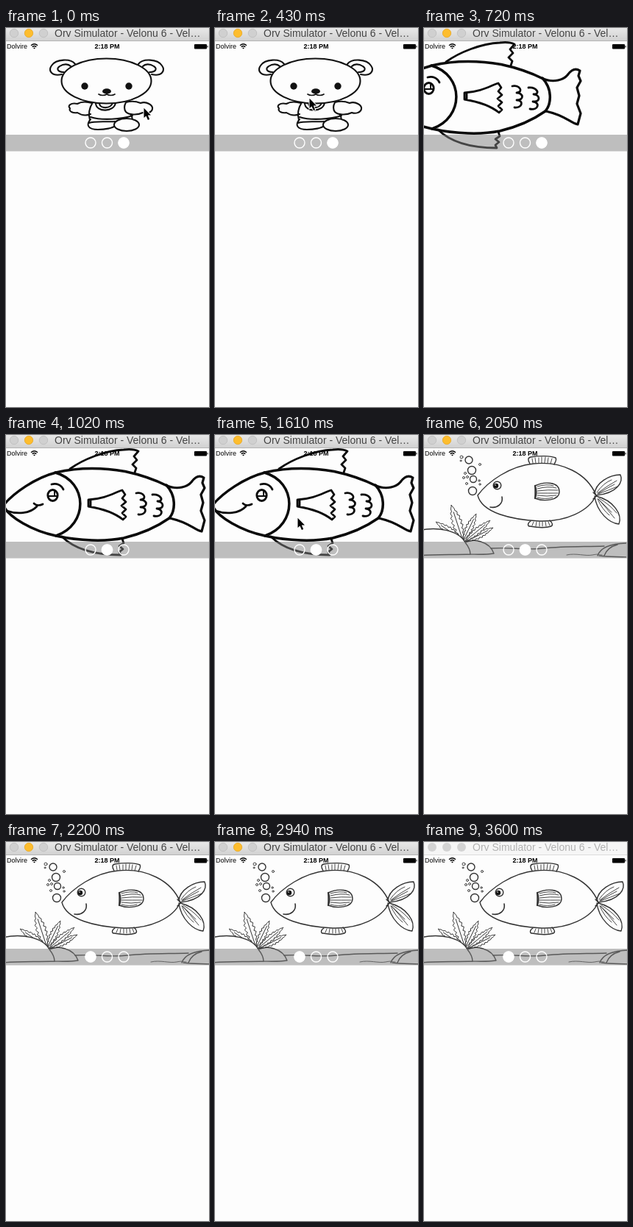
Write an HTML page that moves like this. It is 276 px wide and 515 px high and loops after 3700 ms.

```html
<!DOCTYPE html>
<html lang="en">
<head>
<meta charset="utf-8">
<title>Image pager</title>
<style>
html, body { margin: 0; width: 100%; height: 100%; overflow: hidden; background: #fdfdfd; }
svg { display: block; width: 100vw; height: 100vh; }
text { font-family: "Liberation Sans", Arial, sans-serif; }
.art { fill: none; stroke-linecap: round; stroke-linejoin: round; }
.bear { stroke: #111; stroke-width: 2.1; }
.carp { stroke: #0a0a0a; stroke-width: 3.5; }
.detail { stroke-width: 2.8; }
.reef { stroke: #333; stroke-width: 1.4; }
.thin { stroke-width: .9; }
.ink { fill: #111; stroke: none; }

.strip, .cursor, .dot, .active { animation: 3700ms step-end infinite; }
.strip { animation-name: strip; }
.cursor { animation-name: cursor; }
.dot { animation-name: dot; }
.active { animation-name: active; }

/* one loop = 3700 ms; every pose is held until the next */
@keyframes strip {
  0% { transform: translateX(-282px); }
  15.67% { transform: translateX(-140px); }
  19.45% { transform: translateX(-57px); }
  23.51% { transform: translateX(-3px); }
  27.56% { transform: translateX(0); }
  47.56% { transform: translateX(2px); }
  51.35% { transform: translateX(134px); }
  55.4% { transform: translateX(279px); }
  59.45%, 100% { transform: translateX(282px); }
}
@keyframes cursor {
  0% { transform: translate(186px, 108px); opacity: 1; }
  3.78% { transform: translate(109px, 97px); opacity: 1; }
  7.83% { transform: translate(100px, 94px); opacity: 1; }
  11.62% { transform: translate(127px, 95px); opacity: 1; }
  15.67% { transform: translate(127px, 95px); opacity: 0; }
  31.62% { transform: translate(192px, 109px); opacity: 1; }
  35.4% { transform: translate(148px, 104px); opacity: 1; }
  39.45% { transform: translate(123px, 110px); opacity: 1; }
  43.51% { transform: translate(111px, 112px); opacity: 1; }
  47.56%, 100% { transform: translate(111px, 112px); opacity: 0; }
}
@keyframes dot {
  0% { transform: translateX(160px); }
  27.56% { transform: translateX(137.5px); }
  59.45%, 100% { transform: translateX(115px); }
}
@keyframes active {
  0% { opacity: 1; }
  97.29%, 100% { opacity: 0; }
}
</style>
</head>
<body>
<svg viewBox="0 0 276 515" preserveAspectRatio="none">
  <defs>
    <linearGradient id="bar" x2="0" y2="1">
      <stop stop-color="#e8e8e8"/><stop offset="1" stop-color="#d0d0d0"/>
    </linearGradient>
    <clipPath id="page"><rect x="-3" y="18" width="281" height="150"/></clipPath>
    <g id="ear">
      <path d="M76 63C62 66 57 58 62 51C68 42 88 41 94 49"/>
      <path d="M79 60C70 60 68 55 73 52C79 48 85 49 88 52"/>
    </g>
  </defs>

  <g class="strip">
    <!-- reef fish -->
    <g transform="translate(-282)"><g class="art reef" clip-path="url(#page)">
      <path d="M76 82C90 63 120 42 152 39C190 35 225 52 237 82C227 104 195 118 160 117C122 115 82 106 76 82Z"/>
      <path d="M147 39C144 34 144 31 148 30C160 28 175 28 182 31C184 34 181 37 180 40M148 117C143 120 144 124 147 124C158 126 170 126 176 124C179 122 177 119 174 116"/>
      <path class="thin" d="M151 38l-1-6M155 38l-1-7M159 38v-7M163 38v-8M167 38l1-8M171 38l1-7M175 39l2-7M152 118l-2 5M156 118l-1 6M160 118v6M164 118v6M168 118l1 6M172 118l2 5"/>
      <path d="M154 69V86C166 91 187 89 187 77C187 63 166 63 154 69Z"/>
      <path d="M154 69C156 75 156 80 154 86" stroke-width="2.2"/>
      <path class="thin" d="M157 70Q170 66 179 69M157 73Q172 69 183 72M157 76Q172 74 185 75M157 79Q172 79 185 79M157 82Q170 84 183 82M157 85Q168 88 178 85"/>
      <path d="M235 80C236 65 255 54 270 54C274 63 267 79 237 82M235 83C238 105 255 120 268 121C273 108 261 89 237 83M237 82l-4-4M237 83l-4 4"/>
      <path class="thin" d="M238 78Q247 65 258 61M239 79Q252 69 265 62M240 80Q254 75 266 70M239 80Q250 73 262 67M239 87Q245 101 255 109M240 87Q250 98 262 113M241 86Q255 94 265 106M240 87Q249 96 258 105"/>
      <circle cx="102.500" cy="68.500" r="5.300"/><circle class="ink" cx="101" cy="69" r="3.200"/><circle cx="100" cy="68" r=".8" fill="#fff" stroke="none"/>
      <path d="M109 84C111 93 103 100 93 98" stroke-width="1.6"/>
      <circle cx="64" cy="34" r="5"/><circle cx="68" cy="48" r="5.500"/><circle cx="70" cy="60" r="4.500"/><circle cx="69" cy="76" r="5.500"/>
      <g class="thin">
        <circle cx="54" cy="30" r="2"/><circle cx="53" cy="35" r="1"/><circle cx="79" cy="40" r="1.500"/><circle cx="59" cy="52" r="1.500"/>
        <circle cx="57" cy="58" r="1.500"/><circle cx="62" cy="57" r="1.500"/><circle cx="61" cy="66" r="1.500"/><circle cx="78" cy="62" r="1.200"/><circle cx="79" cy="67" r="1.200"/>
      </g>
      <g id="plant" fill="#fdfdfd" stroke-width="1"></g>
      <path fill="#fdfdfd" d="M58 147C70 140 92 144 98 161C85 163 75 162 60 162Z"/>
      <path fill="#fdfdfd" d="M-5 130C20 124 50 129 59 146C63 151 66 157 66 162C40 163 20 162 -5 164Z"/>
      <path d="M94 154C125 152 135 157 165 154S220 152 248 151"/>
      <path class="thin" d="M197 163C210 160 222 165 232 163S240 163 245 163"/>
      <path d="M239 164C243 153 255 148 279 147M241 164C255 166 268 165 279 166M248 164C251 156 258 151 266 149"/>
    </g></g>

    <!-- winking fish -->
    <g class="art carp" clip-path="url(#page)">
      <path d="M-3 95C10 79 40 58 68 51C98 44 130 44 162 49.500C183 54 203 61 219 69M-3 97C5 112 35 130 68 137C100 144 135 145 160 140C185 134 205 125 222 113M-2.500 94V98"/>
      <path d="M67 51C112 64 112 122 68 137M218 68C231 82 231 102 222 113"/>
      <path d="M219 69C234 75 247 70 252 64C257 57 263 54 269 58L267 65L270 72L265 81L268 92L265 103L270 116L266 131C257 130 249 118 222 113" stroke-width="3.2"/>
      <path class="detail" d="M87 46C105 33 135 21 160 20C168 19 176 20 180 22L174 29L178 34L172 40L177 45L175 51"/>
      <path class="detail" d="M76 138C95 157 125 163 156 163L154 159L159 155L154 151L160 147L158 141"/>
      <path class="detail" d="M112 88V97C130 100 148 106 159 115L163 111L158 106L163 101L157 96L163 91L158 86L162 81L158 75C148 78 135 87 112 88ZM115 88V97"/>
      <path class="detail" d="M177 79C187 77 193 87 183 88C192 88 194 98 183 98C193 98 191 109 180 108M199 81C210 80 216 90 206 90C215 91 216 100 205 100C215 101 213 112 201 110"/>
      <ellipse class="detail" cx="63.500" cy="82" rx="6.700" ry="7.500"/>
      <path d="M57 83H70M66 77V83" stroke-width="2"/>
      <path class="detail" d="M62 67C69 65 75 68 78 74"/>
      <path class="detail" d="M1 103C15 108 33 107 42 97M38 93C41 96 46 96 50 94"/>
    </g>

    <!-- bear -->
    <g transform="translate(282)"><g class="art bear">
      <use href="#ear"/><use href="#ear" transform="matrix(-1 0 0 1 274 0)"/>
      <path d="M117 102C110 100 102 100 97 103C88 101 83 106 87 109C85 114 92 116 97 115C103 119 110 119 115 117"/>
      <path d="M163 101C170 99 178 100 183 102C191 99 200 105 199 110C198 115 191 117 186 115C178 119 167 118 163 114C160 110 161 105 163 101"/>
      <path d="M118 101C113 109 112 118 114 125M169 117C172 120 172 124 171 126M115 121C130 126 158 124 172 119"/>
      <path d="M122 102C122 115 148 115 149 101M127 103C128 110 142 110 145 102"/>
      <path d="M115 124C108 132 112 138 125 138C135 138 145 136 148 133M113 129C120 126 138 128 148 127"/>
      <ellipse cx="164" cy="131.500" rx="17" ry="8.500" fill="#fdfdfd"/>
      <ellipse cx="136.500" cy="72" rx="61" ry="30.500" fill="#fdfdfd"/>
      <circle class="ink" cx="107" cy="79" r="4.700"/><circle class="ink" cx="167" cy="79" r="4.700"/>
      <ellipse class="ink" cx="137" cy="86" rx="6" ry="3.700"/>
      <path d="M137 88V90M126 90C129 92 134 92 137 90C140 92 145 92 148 90" stroke-width="1.700"/>
    </g></g>
  </g>

  <!-- page control -->
  <rect y="145" width="276" height="22.500" fill="#808080" fill-opacity=".5"/>
  <g fill="none" stroke="#fff" stroke-width="1.400">
    <circle cx="115" cy="156" r="7"/><circle cx="137.500" cy="156" r="7"/><circle cx="160" cy="156" r="7"/>
  </g>
  <circle class="dot" cy="156" r="7.600" fill="#fff"/>

  <!-- status bar -->
  <text x="1" y="28" font-size="9">Dolvire</text>
  <text x="137.500" y="28" font-size="9" font-weight="bold" text-anchor="middle">2:18 PM</text>
  <g fill="none" stroke="#000" stroke-width="1.300">
    <path d="M34 23.800Q38.500 19.800 43 23.800M35.700 25.800Q38.500 23.300 41.300 25.800"/>
    <path d="M37 27L38.500 28.500L40 27Q38.500 25.800 37 27Z" fill="#000" stroke="none"/>
  </g>
  <rect x="256" y="22" width="17" height="6.500" rx="1"/>
  <rect x="273.500" y="24" width="1" height="2.500"/>

  <!-- title bar -->
  <rect width="276" height="18" fill="#f6f6f6"/>
  <g fill="#d3d3d3"><circle cx="11" cy="7" r="6"/><circle cx="31" cy="7" r="6"/><circle cx="51" cy="7" r="6"/></g>
  <text x="66" y="12" font-size="14" fill="#b2b2b2">Orv Simulator - Velonu 6 - Vel…</text>
  <rect y="17" width="276" height="1" fill="#dcdcdc"/>
  <g class="active">
    <rect width="276" height="18" fill="url(#bar)"/>
    <g fill="#d0d0d0" stroke="#bcbcbc" stroke-width=".8">
      <circle cx="11" cy="7" r="5.700"/><circle cx="51" cy="7" r="5.700"/>
      <circle cx="31" cy="7" r="5.700" fill="#fdbd2e" stroke="#e8a723"/>
    </g>
    <text x="66" y="12" font-size="14" fill="#444">Orv Simulator - Velonu 6 - Vel…</text>
    <rect y="17" width="276" height="1" fill="#b4b4b4"/>
  </g>

  <path class="cursor" d="M1.500 .8V14L4.500 11.400L6.900 17L9.200 16L6.800 10.600H11Z" stroke="#fff" stroke-width="2" paint-order="stroke"/>
</svg>
<script>
// Wavy-edged leaf from its base to its tip.
function leaf(x0, y0, x1, y1, width) {
  const dx = x1 - x0, dy = y1 - y0, len = Math.hypot(dx, dy), n = 24;
  const edge = (k, side) => {
    const s = k / n;
    const w = side * width * Math.sin(Math.PI * s) * (1 + .28 * Math.sin(k * 2.1));
    return [x0 + dx * s - dy / len * w, y0 + dy * s + dx / len * w].map(v => v.toFixed(1));
  };
  const pts = [];
  for (let k = 0; k <= n; k++) pts.push(edge(k, 1));
  for (let k = n; k >= 0; k--) pts.push(edge(k, -1));
  return `<path d="M${pts.join('L')}ZM${x0} ${y0}L${x0 + dx * .8} ${y0 + dy * .8}"/>`;
}
document.getElementById('plant').innerHTML = [
  [60, 145, 97, 126, 4], [58, 145, 93, 116, 4], [56, 144, 74, 107, 4.5],
  [56, 143, 19, 118, 4.5], [56, 144, 40, 95, 6]
].map(a => leaf(...a)).join('');
</script>
</body>
</html>
```
